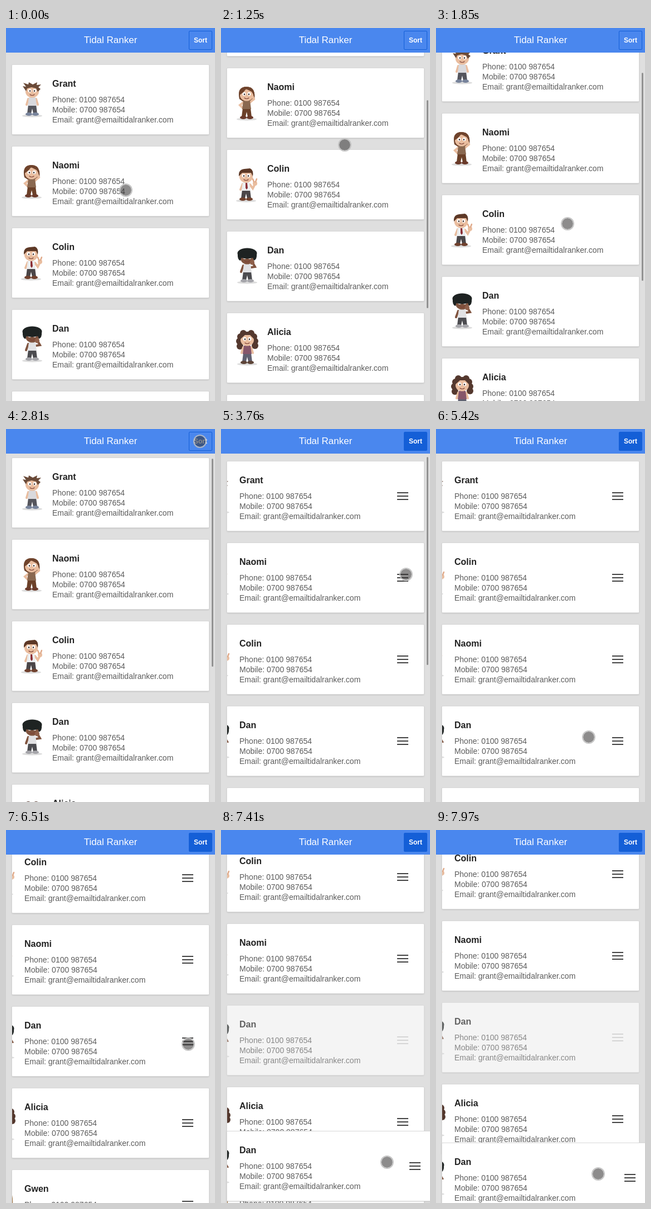
Write an HTML page that moves like this. It is 375 by 667 pixels and loops after 8000 ms.

```html
<!DOCTYPE html>
<html lang="en">
<head>
<meta charset="utf-8">
<title>Contact list</title>
<style>
  html, body { margin: 0; width: 100%; height: 100%; overflow: hidden; }
  body { position: relative; background: #dfdfdf; font: 14px/18px "Liberation Sans", Arial, sans-serif; color: #5c5c5c; }
  body *, body svg { position: absolute; }
  svg * { position: static; }
  header { left: 0; top: 0; width: 375px; height: 44px; background: #4a87ee; color: #fff; z-index: 2; }
  header h1 { margin: 0; width: 375px; text-align: center; font: 17px/43px "Liberation Sans", Arial, sans-serif; }
  #sort { left: 328px; top: 5px; width: 40px; height: 32px; border: 1px solid #145fd7; border-radius: 2px;
    font-size: 12px; font-weight: bold; line-height: 32px; text-align: center; }
  .card { left: 11px; top: 0; width: 353px; height: 124px; overflow: hidden; background: #fff; border-radius: 1px;
    box-shadow: 0 0 0 1px #d9d9d9, 0 1px 3px rgba(0, 0, 0, .25); }
  .body { left: 0; top: 0; width: 100%; height: 100%; }
  .body svg { left: 17px; top: 28px; overflow: visible; }
  .body h2 { margin: 0; left: 72px; top: 24px; font-size: 16px; line-height: 20px; color: #222; }
  .body p { margin: 0; left: 72px; top: 53px; white-space: pre; }
  .grip { right: 28px; top: 55px; width: 20px; height: 14px;
    background: linear-gradient(#444 2px, transparent 2px) 0 0 / 20px 6px; }
  .ghost { width: 375px; z-index: 1; }
  #bar { left: 369px; top: 0; width: 3px; height: 372px; border-radius: 2px; background: #929292; z-index: 1; }
  #cursor { left: -12px; top: -12px; width: 20px; height: 20px; border: 2px solid rgba(190, 190, 190, .85);
    border-radius: 50%; background: rgba(48, 46, 46, .55); background-clip: padding-box; z-index: 3; }
</style>
</head>
<body>
<header><h1>Tidal Ranker</h1><div id="sort">Sort</div></header>
<div id="bar"></div>
<div id="cursor"></div>
<script>
const LOOP = 8000, PITCH = 146, FIRST_TOP = 66;

const path = (d, fill) => `<path d="${d}" fill="${fill}"/>`;
const oval = (x, y, rx, ry, fill) => `<ellipse cx="${x}" cy="${y}" rx="${rx}" ry="${ry}" fill="${fill}"/>`;
const line = (d, color, width) =>
  `<path d="${d}" fill="none" stroke="${color}" stroke-width="${width}" stroke-linecap="round"/>`;

// A small big-headed figure in a 40 x 66 box; back lies behind the head, front over it.
function figure({ skin = '#e9bd9f', shirt, pants, shoes, x = 19, back = '', front = '', arms }) {
  return `<svg width="40" height="66">` +
    oval(x, 63, 18, 2.5, '#dcdcdc') + back +
    line(arms || `M${x - 7} 33L${x - 10} 43M${x + 7} 33L${x + 10} 43`, skin, 4) +
    path(`M${x - 7} 43h14l2 16h-7l-2-9-2 9h-7z`, pants) +
    path(`M${x - 6} 30h12l2 15h-16z`, shirt) +
    oval(x - 6, 60, 6, 3, shoes) + oval(x + 6, 60, 6, 3, shoes) +
    oval(x, 20, 12, 10.5, skin) +
    oval(x - 4.5, 18, 3, 3.2, '#fff') + oval(x + 4.5, 18, 3, 3.2, '#fff') +
    oval(x - 4, 18.5, 1.2, 1.6, '#3a2c28') + oval(x + 4, 18.5, 1.2, 1.6, '#3a2c28') +
    line(`M${x - 4} 25q4 3 8 0`, '#7d4034', 1.2) + front + '</svg>';
}

const curls = (color) => [[7, 14], [5, 22], [6, 31], [31, 14], [33, 22], [33, 30], [12, 8], [26, 8]]
  .map(([x, y]) => oval(x, y, 6, 6, color)).join('');

const people = [
  ['Grant', figure({ shirt: '#d9d9dd', pants: '#55555c', shoes: '#77839b',
    front: path('M8 19L2 10l6 1-5-7 9 3 1-4 7 4 8-4-1 5 8-1-5 5 4 3-5 5-3-6-8-2-8 2z', '#6a4a38') })],
  ['Naomi', figure({ x: 18, shirt: '#8a6850', pants: '#6b4028', shoes: '#6a3a2a',
    arms: 'M12 33L6 38l6 6M24 33L31 27L28 21',
    back: path('M5 27Q0 5 18 5Q35 5 32 29L25 31H11z', '#6f432c'),
    front: path('M4 21Q4 5 18 5Q33 6 32 22L27 14 17 9 12 15z', '#6f432c') })],
  ['Colin', figure({ x: 17, shirt: '#eceef0', pants: '#4b4648', shoes: '#70412e',
    arms: 'M11 33L7 43M24 34L29 41L33 33',
    front: path('M4 19Q3 7 14 6L24 5Q31 8 29 19L26 13H10z', '#5d3826') +
      path('M16 31h3l1 9-2 3-2-3z', '#8c2f35') + oval(33, 32, 4, 4, '#e9bd9f') +
      line('M31 29L29 24M34 29L36 24', '#e0aa8a', 2.5) })],
  ['Dan', figure({ skin: '#80543f', shirt: '#e2e2e4', pants: '#4c4c50', shoes: '#a5a5aa',
    arms: 'M12 33L8 44M26 36L33 35L29 28',
    front: oval(19, 11, 17.5, 9.5, '#1e2322') + path('M2 11Q1 23 7 24L10 15H28L31 24Q37 22 36 11z', '#1e2322') +
      oval(28, 27, 4, 4.5, '#8f604a') })],
  ['Alicia', figure({ shirt: '#86566a', pants: '#606070', shoes: '#5d4438', back: curls('#54382e'),
    front: path('M6 19Q7 5 19 5Q32 5 32 19L24 11H15z', '#54382e') })],
  ['Gwen', figure({ shirt: '#6f8a94', pants: '#4e5668', shoes: '#54423c',
    back: path('M4 34Q2 5 19 5Q36 5 34 34z', '#a07444'),
    front: path('M6 19Q7 5 19 5Q32 5 32 19L24 11z', '#a07444') })],
  ['Martin', figure({ shirt: '#8fa07c', pants: '#505058', shoes: '#5b4a40',
    front: path('M6 18Q7 5 19 5Q32 5 32 18L27 12H11z', '#47362e') })],
];

function addCard([name, avatar], extra = '') {
  const card = document.createElement('div');
  card.className = 'card ' + extra;
  card.innerHTML = `<div class="body">${avatar}<h2>${name}</h2>` +
    `<p>Phone: 0100 987654\nMobile: 0700 987654\nEmail: grant@emailtidalranker.com</p></div><div class="grip"></div>`;
  document.body.append(card);
  return card;
}
const cards = people.map(person => addCard(person));

// Each drag: card index, start, end, and list order once it is dropped.
const drags = [
  { card: 1, from: 4140, to: 4870 },
  { card: 3, from: 6690, to: LOOP },
];
for (const drag of drags) drag.ghost = addCard(people[drag.card], 'ghost');

// The screen refreshes in bursts of evenly spaced ticks.
const ticks = [0];
for (const [from, to, count] of [[670, 1650, 6], [1850, 2810, 6], [3010, 3940, 6], [4140, 5050, 6],
  [5230, 6140, 6], [6330, 7240, 6], [7410, 7970, 4]])
  for (let i = 0; i < count; i++)
    ticks.push(Math.round((from + (to - from) * i / (count - 1)) / 10) * 10);

const pointerKeys = [[0, 215, 290], [670, 215, 290], [1060, 222, 209], [1260, 225, 209], [1850, 236, 350],
  [2040, 240, 389], [2230, 262, 310], [2620, 345, 34], [2810, 348, 22], [3200, 348, 22], [3570, 337, 225],
  [3750, 332, 260], [4140, 331, 262], [4690, 318, 408], [4870, 312, 412], [5050, 280, 530], [5230, 274, 551],
  [5410, 274, 551], [6140, 276, 371], [6330, 312, 381], [6510, 327, 383], [6690, 327, 384], [7240, 300, 588],
  [7970, 291, 615]];
const scrollKeys = [[0, 0], [670, 0], [1060, 140], [1260, 200], [1450, 180], [1850, 59], [2040, 20], [2430, 14],
  [2810, 14], [3010, 8], [5410, 8], [6140, 188], [7240, 188], [7970, 195]];
const barKeys = [[670, 0], [870, 1], [3750, 1], [4140, 0], [5410, 0], [5590, 1], [6140, 1], [6510, 0]];
const editKeys = [[3010, 0], [3380, 1]];

function sample(keys, t, column = 1) {
  const next = keys.findIndex(key => key[0] > t);
  if (next < 0) return keys[keys.length - 1][column];
  if (next === 0) return keys[0][column];
  const a = keys[next - 1], b = keys[next];
  return a[column] + (b[column] - a[column]) * (t - a[0]) / (b[0] - a[0]);
}

const byId = id => document.getElementById(id);
const move = (element, x, y) => element.style.transform = `translate(${x}px, ${Math.round(y)}px)`;

function setEditing(card, amount) {
  move(card.children[0], -50 * amount, 0);
  move(card.children[1], 50 * (1 - amount), 0);
}

function draw(now) {
  const time = now % LOOP;
  const t = ticks.filter(tick => tick <= time).pop();
  const scroll = sample(scrollKeys, t), edit = sample(editKeys, t);
  const x = sample(pointerKeys, t, 1), y = sample(pointerKeys, t, 2);
  const dragging = drags.find(drag => t >= drag.from && t < drag.to);
  const order = t < drags[0].to ? [0, 1, 2, 3, 4, 5, 6] : [0, 2, 1, 3, 4, 5, 6];

  order.forEach((person, slot) => {
    const card = cards[person], held = dragging && dragging.card === person;
    move(card, 0, FIRST_TOP + slot * PITCH - scroll);
    setEditing(card, edit);
    card.style.opacity = held ? .66 : 1;
    card.children[1].style.opacity = held ? .25 : 1;
  });
  for (const drag of drags) {
    drag.ghost.hidden = drag !== dragging;
    setEditing(drag.ghost, 1);
    move(drag.ghost, 0, y - 55);
  }
  byId('sort').style.background = t >= 3010 ? '#145fd7' : 'none';
  byId('bar').style.opacity = sample(barKeys, t);
  move(byId('bar'), 0, 45 + scroll * .6);
  move(byId('cursor'), x, y);
  requestAnimationFrame(draw);
}

let start;
requestAnimationFrame(function begin(now) {
  start = now;
  const loop = draw;
  loop(now - start);
});
</script>
</body>
</html>
```
